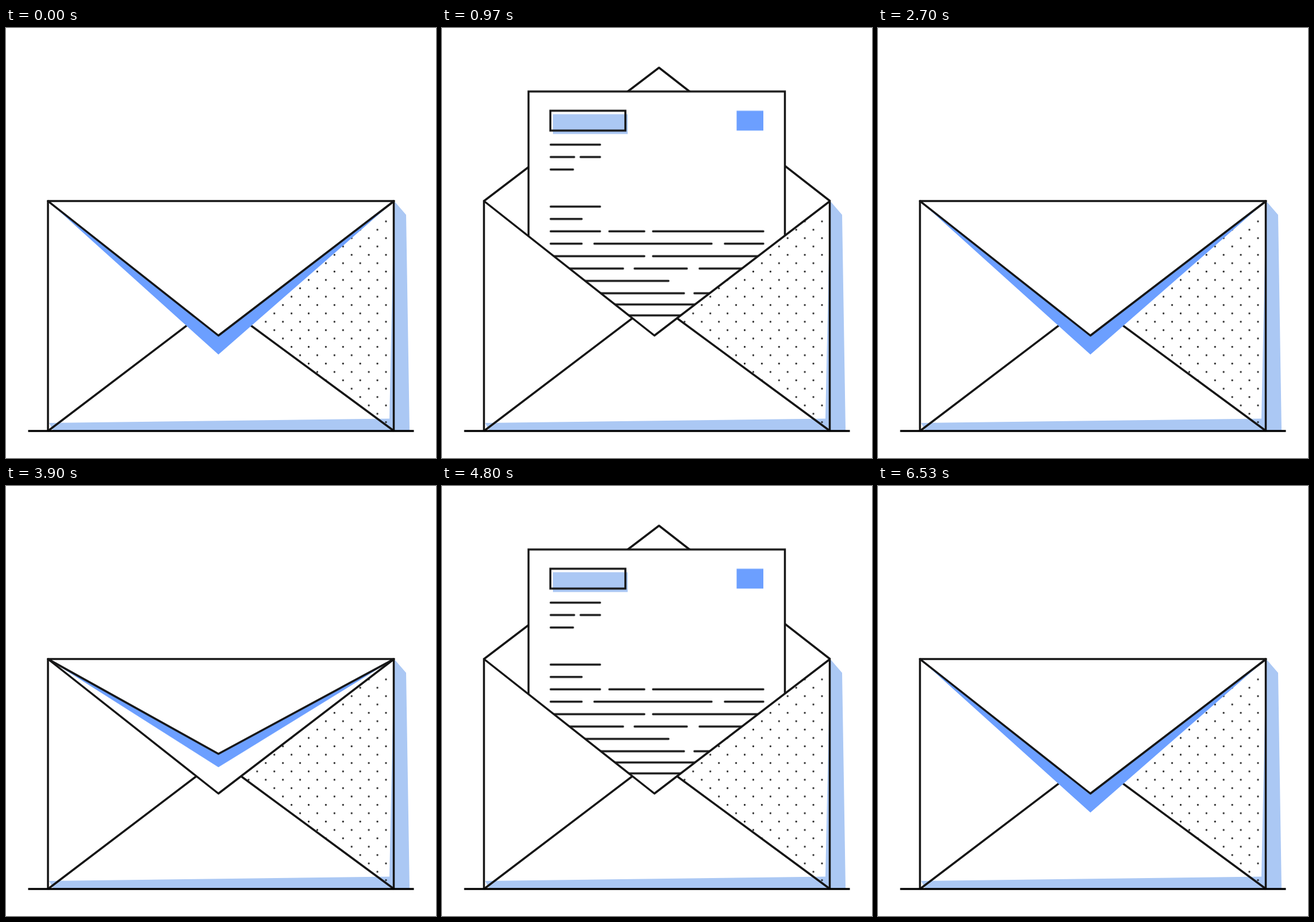
Animation, 748 px wide and 748 px high, one loop 7.66 s. Source, as an HTML page without scripts:

```html
<!DOCTYPE html>
<html lang="en">
<head>
<meta charset="utf-8">
<title>Letter and envelope</title>
<style>
  html, body { margin: 0; width: 100%; height: 100%; overflow: hidden; background: #fff; }
  svg { display: block; width: 100vw; height: 100vh; }

  .ink { fill: none; stroke: #161616; stroke-width: 3.5; stroke-linejoin: round; }
  .paper { fill: #fff; }
  .pale { fill: #abc8f4; }
  .blue { fill: #6c9fff; }
  .flap path { vector-effect: non-scaling-stroke; }

  .flap, .letter { animation: 3830ms linear infinite; }
  .flap { transform-origin: 0 301px; }
  .closed { animation-name: fold-front; }
  .open { animation-name: fold-back; }
  .letter { animation-name: slide; }

  @keyframes fold-front {
    0%, 1.044% { transform: scaleY(1); }
    3.786%, 67.755% { transform: scaleY(0); }
    70.496%, 100% { transform: scaleY(1); }
  }
  @keyframes fold-back {
    0%, 3.786% { transform: scaleY(0); }
    6.527%, 65.013% { transform: scaleY(1); }
    67.755%, 100% { transform: scaleY(0); }
  }
  /* Rise past the resting height, settle, then drop back inside. */
  @keyframes slide {
    0% { transform: translateY(545px); }
    11.227% { transform: translateY(545px); animation-timing-function: cubic-bezier(.3, .55, .65, 1); }
    21.018% { transform: translateY(91px); }
    21.932% { transform: translateY(91px); animation-timing-function: ease-in-out; }
    27.023% { transform: translateY(116px); }
    53.003% { transform: translateY(116px); animation-timing-function: cubic-bezier(.333, 0, .667, .333); }
    64.491%, 100% { transform: translateY(560px); }
  }
</style>
</head>
<body>
<svg viewBox="0 0 748 748" role="img" aria-label="A letter rising out of an envelope">
  <defs>
    <clipPath id="pocket">
      <path d="M0 0H748V301H675L369.5 535L73 301H0Z"/>
    </clipPath>
    <pattern id="dots" x="653.5" y="328.9" width="29.88" height="29.1" patternUnits="userSpaceOnUse">
      <circle cx="7.5" cy="7.5" r="1.6" fill="#222"/>
      <circle cx="22.44" cy="22.05" r="1.6" fill="#222"/>
    </pattern>
  </defs>

  <path class="pale" d="M75 687L667 679.5L675 303H677L696 325L702 700H82Z"/>

  <g class="flap open">
    <path class="ink paper" style="fill:#fff" d="M73 301L377.5 69L675 301"/>
  </g>

  <g clip-path="url(#pocket)">
    <g class="letter">
      <path class="ink" style="fill:#fff;stroke-linejoin:miter" d="M150.5 0H596.5V520H150.5Z"/>
      <path class="pale" d="M193 39.5H323V74H193Z"/>
      <path class="ink" style="stroke-linejoin:miter" d="M188.5 33.5H319V68H188.5Z"/>
      <path class="blue" d="M512.5 33.5H559V68H512.5Z"/>
      <path class="ink" stroke-linecap="round" d="
        M189 92.5H275
        M189 114H230M241 114H275
        M189 135.7H228
        M189 200.3H275
        M189 221.8H243
        M189 243.3H275M291 243.3H352M367 243.3H559
        M189 264.8H243M265 264.8H469M492 264.8H559
        M189 286.4H352M367 286.4H559
        M189 308H315M335 308H426M448 308H559
        M189 329.5H394
        M189 351H421M439 351H559
        M189 370.5H559
        M189 389.5H559"/>
    </g>
  </g>

  <path fill="url(#dots)" d="M675 301L409 505L675 701Z"/>
  <path class="ink" d="M73 301L369.5 535L675 301M73 701L331 505M409 505L675 701"/>
  <path class="ink" d="M73 299.5V701M674.5 299.5V701"/>

  <g class="flap closed">
    <path class="blue" d="M73 301L369.5 568L675 301Z"/>
    <path class="ink" style="fill:#fff" d="M73 301H675L369.5 535Z"/>
  </g>

  <path d="M38.5 701H709.5" stroke="#000" stroke-width="3.5"/>
</svg>
</body>
</html>
```
